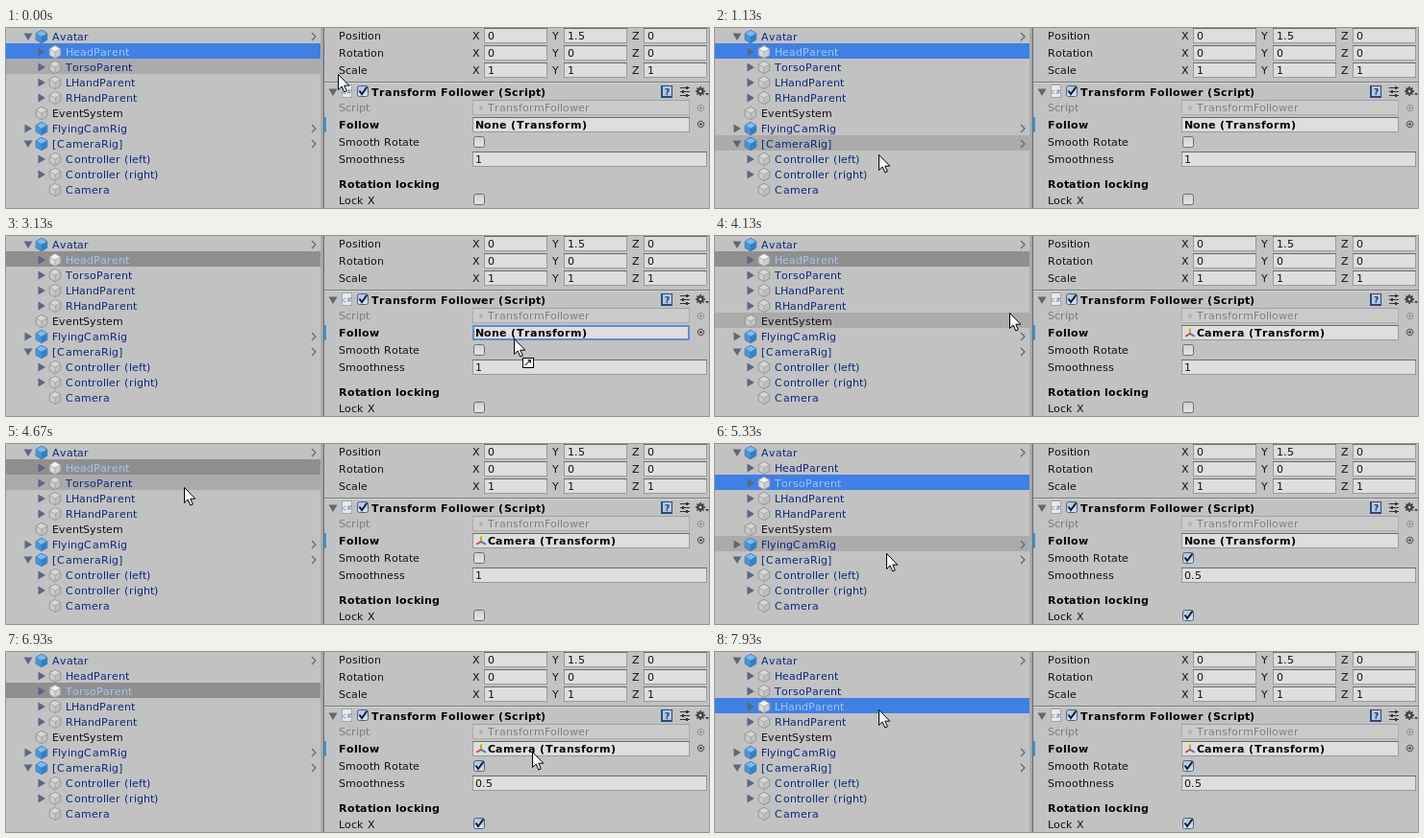
An HTML page with a canvas that plays this animation: 731x188 px, repeating every 8 s.

```html
<!DOCTYPE html>
<html lang="en">
<head>
<meta charset="utf-8">
<title>Assigning follow targets</title>
<style>
html, body { margin: 0; width: 100%; height: 100%; overflow: hidden; background: #c2c2c2; }
canvas { display: block; }
</style>
</head>
<body>
<canvas id="stage" width="731" height="188"></canvas>
<script>
const ctx = document.getElementById('stage').getContext('2d');
const LOOP = 8000, STEP = 1000 / 15, ROW = 16, CAMERA = 10;

const labels = ['Avatar', ' HeadParent', ' TorsoParent', ' LHandParent', ' RHandParent', 'EventSystem',
  'FlyingCamRig', '[CameraRig]', ' Controller (left)', ' Controller (right)', ' Camera'];

// pointer stops: x, y, arrival and, where it rests, departure
const stops = [
  [310, 44, -67], [345, 48, 0], [507, 112, 400], [215, 112, 867], [170, 132, 1133],
  [165, 137, 1267, 1600], [160, 137, 1733, 1867], [132, 169, 2133, 2600],
  [542, 105, 3200, 3867], [306, 80, 4133], [185, 45, 4533, 5000], [178, 114, 5333],
  [150, 169, 5533, 5733], [554, 105, 6467, 6867], [170, 60, 7667, LOOP]
];
const drags = [{ press: 2660, drop: 3590 }, { press: 5860, drop: 6920 }];
const clicks = [4860, 7920];
const SWITCH = 5060, GRAB = 130;

// Glides from stop to stop, slowing down only beside a rest
function pointerAt(t) {
  let i = stops.findIndex(s => s[2] >= t);
  i = i < 0 ? stops.length - 1 : Math.max(1, i);
  const [x0, y0, in0, out0 = in0] = stops[i - 1];
  const [x1, y1, in1, out1 = in1] = stops[i];
  const u = Math.min(1, Math.max(0, (t - out0) / (in1 - out0)));
  const from = out0 > in0 ? 0 : 1, to = out1 > in1 ? 0 : 1;
  const e = from * u * (1 - u) ** 2 + u * u * (3 - 2 * u) - to * u * u * (1 - u);
  return { x: Math.round(x0 + (x1 - x0) * e), y: Math.round(y0 + (y1 - y0) * e) };
}

function rect(x, y, w, h, color) {
  ctx.fillStyle = color;
  ctx.fillRect(x, y, w, h);
}

function trace(points) {
  ctx.beginPath();
  points.forEach(([x, y]) => ctx.lineTo(x, y));
}

function poly(points, fill, stroke) {
  trace(points);
  ctx.closePath();
  if (fill) { ctx.fillStyle = fill; ctx.fill(); }
  if (stroke) { ctx.strokeStyle = stroke; ctx.lineWidth = 1; ctx.stroke(); }
}

function line(points, color, width = 1) {
  trace(points);
  ctx.strokeStyle = color;
  ctx.lineWidth = width;
  ctx.stroke();
}

function dot(x, y, r, color) {
  ctx.beginPath();
  ctx.arc(x, y, r, 0, 7);
  ctx.fillStyle = color;
  ctx.fill();
}

// Points of a regular ring, starting at the top
const ring = (x, y, r, n) => Array.from({ length: n }, (_, k) => {
  const a = k * 2 * Math.PI / n;
  return [x + r * Math.sin(a), y - r * Math.cos(a)];
});

// Text on whole-pixel advances, like hinted screen type
function text(s, x, y, color = '#111', style = '11px') {
  const broad = style === '11px' ? /[C()[\]]/ : /[()]/;
  ctx.font = style + ' "DejaVu Sans", Verdana, sans-serif';
  ctx.fillStyle = color;
  for (const c of s) {
    ctx.fillText(c, x, y);
    x += Math.round(ctx.measureText(c).width + .15) + (broad.test(c) ? 1 : 0);
  }
}
const bold = (s, x, y) => text(s, x, y, '#000', 'bold 11px');

function foldout(x, y, open, color = '#5a6880') {
  poly(open ? [[x - 4.5, y - 3.5], [x + 4.5, y - 3.5], [x, y + 4]]
            : [[x - 3.5, y - 4.5], [x + 4, y], [x - 3.5, y + 4.5]], color);
}

const paints = {
  blue: ['#7fbdf0', '#4595dc', '#2f80c8', '#3a7ebd'],
  grey: ['#d8d8d8', '#cacaca', '#c0c0c0', '#969696'],
  lit: ['#f2f2f2', '#dcdcdc', '#cccccc', '#a0a0a0']
};

function cube(x, y, paint) {
  const [top, left, right, edge] = paints[paint];
  const [a, b, c, d, e, f] = ring(x, y, 6.7, 6), m = [x, y];
  poly([a, b, m, f], top);
  poly([f, m, d, e], left);
  poly([m, b, c, d], right);
  line([f, m, b], edge, .6);
  line([m, d], edge, .6);
  poly([a, b, c, d, e, f], null, edge);
}

function hierarchy(selected, shade, hover) {
  labels.forEach((label, i) => {
    const top = i * ROW, mid = top + 9, x = label[0] === ' ' ? 14 : 0;
    const chosen = i === selected, scenery = label === 'EventSystem', prefab = !x && !scenery;
    if (chosen || i === hover) rect(0, top, 327, ROW, chosen ? shade : '#ababab');
    if (!scenery && i !== CAMERA) foldout(23 + x, mid, /Avatar|\[/.test(label));
    cube(37 + x, mid, prefab ? 'blue' : chosen ? 'lit' : 'grey');
    text(label.trim(), 48 + x, top + 13, chosen ? '#a4c4f5' : scenery ? '#111' : '#0a2880');
    if (prefab) line([[318, mid - 4], [322, mid], [318, mid + 4]], '#666', 1.2);
  });
  rect(327, 0, 1, 188, '#b2b2b2');
  rect(328, 0, 2, 188, '#a5a5a5');
  rect(330, 0, 1, 188, '#6a6a6a');
}

function field(x, y, w, off = false) {
  rect(x, y, w, 16, off ? '#adadad' : '#9a9a9a');
  rect(x, y, w, 1, off ? '#a0a0a0' : '#6c6c6c');
  rect(x + 1, y + 1, w - 2, 14, off ? '#cbcbcb' : '#dedede');
}

function checkbox(x, y, on) {
  ctx.beginPath();
  ctx.roundRect(x + .5, y + .5, 11, 11, 2);
  const shine = ctx.createLinearGradient(0, y, 0, y + 12);
  shine.addColorStop(0, on ? '#a9bfdc' : '#cfcfcf');
  shine.addColorStop(1, on ? '#dbe6f4' : '#e6e6e6');
  ctx.fillStyle = shine;
  ctx.fill();
  ctx.strokeStyle = on ? '#4d6485' : '#6e6e6e';
  ctx.lineWidth = 1;
  ctx.stroke();
  if (on) line([[x + 2.5, y + 5.5], [x + 5, y + 9], [x + 10.5, y + 1.5]], '#101d33', 2);
}

function picker(y, color) {
  poly(ring(722.5, y, 3.2, 16), null, color);
  dot(722.5, y, 1.2, color);
}

function scriptIcon(x, y) {
  rect(x - 5, y - 7, 11, 14, '#a5a5a5');
  rect(x - 4, y - 6, 9, 12, '#e9e9e9');
  text('c#', x - 4, y + 3, '#4a80b8', '7px');
}

function axes(x, y) {
  const [up, right, left] = ring(x, y, 5.5, 3);
  line([[x, y], up], '#d9a514', 2);
  line([[x, y], left], '#d4451f', 2);
  line([[x, y], right], '#3474d6', 2);
}

function headerIcons() {
  rect(681, 60, 12, 13, '#2a4a7a');
  rect(683, 61, 9, 10, '#b4c8e2');
  text('?', 685, 70, '#1d3c66', 'bold 9px');
  for (let i = 0; i < 3; i++) {
    rect(701, 62 + i * 4, 10, 1, '#333');
    rect(707 - i % 2 * 4, 61 + i * 4, 2, 3, '#333');
  }
  ring(722, 66, 5, 8).forEach(p => line([[722, 66], p], '#3c3c3c', 1.6));
  dot(722, 66, 3.6, '#3c3c3c');
  dot(722, 66, 1.5, '#c2c2c2');
  poly([[727, 68], [731, 68], [729, 70.5]], '#3c3c3c');
}

function inspector(torso, assigned, dropping) {
  const left = 346, value = 485;
  ['Position', 'Rotation', 'Scale'].forEach((label, r) => {
    const y = r * 18;
    text(label, left, y + 12);
    ['X', 'Y', 'Z'].forEach((axis, c) => {
      const x = value + c * 83;
      text(axis, x, y + 12);
      field(x + 12, y, 66);
      text(r === 2 ? '1' : r === 0 && c === 1 ? '1.5' : '0', x + 16, y + 12);
    });
  });

  rect(331, 56, 400, 1, '#7c7c7c');
  rect(331, 57, 400, 1, '#d4d4d4');
  foldout(340, 67, true, '#666');
  scriptIcon(354, 66);
  checkbox(365, 60, true);
  bold('Transform Follower (Script)', 380, 71);
  headerIcons();

  text('Script', left, 87, '#7d7d7d');
  field(value, 75, 226, true);
  text('#', 491, 86, '#94a3b4', '7px');
  text('TransformFollower', 501, 87, '#808080');
  picker(83.5, '#8a8a8a');

  rect(331, 93, 2, 16, '#2f9be0');
  bold('Follow', left, 105);
  field(value, 93, 226);
  if (dropping) {
    ctx.strokeStyle = '#5b8fd8';
    ctx.lineWidth = 2;
    ctx.strokeRect(486, 94, 224, 14);
  }
  if (assigned) axes(494, 102);
  bold(assigned ? 'Camera (Transform)' : 'None (Transform)', assigned ? 501 : 488, 105);
  picker(100.5, '#333');

  text('Smooth Rotate', left, 123);
  checkbox(486, 113, torso);
  text('Smoothness', left, 141);
  field(value, 129, 244);
  text(torso ? '0.5' : '1', 488, 141);
  bold('Rotation locking', left, 167);
  text('Lock X', left, 184);
  checkbox(486, 173, torso);
}

function pointer({ x, y }, dragging) {
  const arrow = [[0, 0], [0, 16], [3.7, 12.5], [6.3, 18.5], [8.8, 17.4], [6.3, 11.7], [11.3, 11.7]];
  poly(arrow.map(([dx, dy]) => [x + dx + .5, y + dy + .5]), '#fff', '#000');
  if (!dragging) return;
  rect(x + 9, y + 20, 12, 11, '#000');
  rect(x + 10, y + 21, 10, 9, '#fff');
  line([[x + 12, y + 28], [x + 17, y + 23]], '#000');
  poly([[x + 14, y + 22], [x + 18, y + 22], [x + 18, y + 26]], '#000');
}

function draw(t) {
  const pos = pointerAt(t), before = pointerAt(t - STEP);
  const pressed = drags.some(d => t >= d.press && t < d.press + GRAB);
  const dragging = drags.some(d => t >= d.press + GRAB && t < d.drop);
  const blurred = drags.some((d, i) => t >= d.press + GRAB && t < clicks[i]);
  const overField = pos.x > 485 && pos.y >= 93 && pos.y < 109;

  const picked = 1 + clicks.filter(c => t >= c).length;
  const torso = t >= SWITCH;
  const assigned = t >= drags[torso ? 1 : 0].drop;
  // the highlight trails the pointer by one step
  const hover = pos.x < 346 && !dragging ? Math.floor(before.y / ROW) : -1;

  rect(0, 0, 731, 188, '#c2c2c2');
  hierarchy(pressed ? CAMERA : picked, blurred ? '#8f8f8f' : '#3e80e6', hover);
  inspector(torso, assigned, dragging && overField);
  pointer(pos, dragging);
}

function tick(now) {
  // the screen was sampled 15 times a second
  draw(Math.floor((now % LOOP + 5) / STEP) * STEP);
  requestAnimationFrame(tick);
}
requestAnimationFrame(tick);
</script>
</body>
</html>
```
